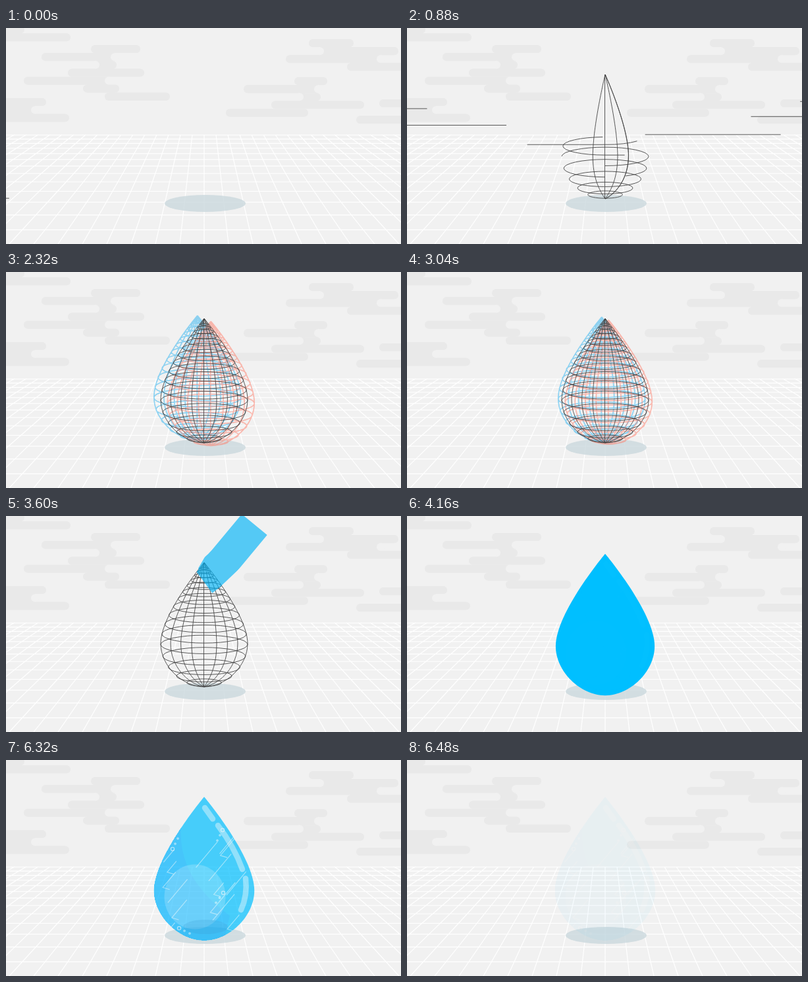
An HTML page with a canvas that plays this animation: 600 by 330 pixels, repeating every 6.56 s.

```html
<!DOCTYPE html>
<html lang="en">
<head>
<meta charset="utf-8">
<title>Water drop</title>
<style>
  html, body { margin: 0; width: 100%; height: 100%; overflow: hidden; background: #f1f1f1; }
  canvas { display: block; }
</style>
</head>
<body>
<canvas id="stage" width="600" height="330"></canvas>
<script>
const screen2d = document.getElementById('stage').getContext('2d');
const layer2d = new OffscreenCanvas(600, 330).getContext('2d');
let ctx = screen2d;

const LOOP = 6560, STEP = 80, CX = 301, TOP = 71, BELLY = 195, RADIUS = 66;
const TAU = Math.PI * 2, RING_COUNT = 16;
const BACK = '#f1f1f1', CLOUD = '#e9e9e9', WIRE = '#444';

const clamp = v => Math.max(0, Math.min(1, v));
const span = (t, from, to) => clamp((t - from) / (to - from));
const sine = u => (1 - Math.cos(Math.PI * u)) / 2;
const quadOut = u => 1 - (1 - u) ** 2;
const backOut = u => 1 + 3.5 * (u - 1) ** 3 + 2.5 * (u - 1) ** 2;

// Each cloud is a top edge and a stack of bars given by their left and right ends.
const CLOUDS = [
  [-4, [-20, 28], [-20, 98]],
  [26, [129, 204], [54, 159], [142, 168], [94, 210], [27, 150], [117, 172], [150, 249]],
  [107, [-20, 61], [-20, 38], [-20, 96]],
  [17, [460, 528], [483, 596], [425, 563], [518, 620]],
  [75, [438, 488], [361, 468], [452, 478], [403, 544], [334, 459]],
  [109, [567, 620]],
  [134, [532, 620]]
];

function stroke(color, width, build) {
  ctx.strokeStyle = color;
  ctx.lineWidth = width;
  ctx.beginPath();
  build();
  ctx.stroke();
}

function fillEllipse(color, x, y, rx, ry = rx) {
  ctx.fillStyle = color;
  ctx.beginPath();
  ctx.ellipse(x, y, rx, ry, 0, 0, TAU);
  ctx.fill();
}

// A bar end that falls short of both neighbours is hollow, any other is round.
function drawCloud([top, ...bars]) {
  const pitch = 12.1, r = 6;
  const hollows = [];
  bars.forEach(([left, right], i) => {
    const above = bars[i - 1], below = bars[i + 1], y = top + i * pitch;
    const inner = above && below;
    const l = inner && above[0] < left && below[0] < left;
    const rt = inner && above[1] > right && below[1] > right;
    const start = left - (l ? r : 0), end = right + (rt ? r : 0);
    ctx.fillStyle = CLOUD;
    ctx.beginPath();
    ctx.roundRect(start, y, end - start, pitch + .2, [l ? 0 : r, rt ? 0 : r, rt ? 0 : r, l ? 0 : r]);
    ctx.fill();
    if (l) hollows.push([start, y + pitch / 2]);
    if (rt) hollows.push([end, y + pitch / 2]);
  });
  for (const [x, y] of hollows) fillEllipse(BACK, x, y, r);
}

function drawScene() {
  ctx.fillStyle = BACK;
  ctx.fillRect(0, 0, 600, 330);
  CLOUDS.forEach(drawCloud);
  stroke('#fff', 1.2, () => {
    for (let k = 0; k <= 12; k++) {
      const y = 25.7 + 137.8 / (1 - .0427 * k);
      ctx.moveTo(0, y);
      ctx.lineTo(600, y);
    }
    for (let i = -17; i <= 17; i++) {
      ctx.moveTo(CX + 18 * i, 163);
      ctx.lineTo(CX + 37 * i, 330);
    }
  });
  fillEllipse('rgba(203,217,222,.8)', 302.5, 268, 61.5, 13);
}

// Inner meridians meet the bottom at a sharper angle than the outline.
function halfDrop(w) {
  const x = CX + w, lift = (RADIUS - Math.abs(w)) * .3;
  ctx.moveTo(CX, TOP);
  ctx.bezierCurveTo(CX, TOP, x, 150, x, BELLY);
  ctx.bezierCurveTo(x, 229, CX + w * .5, 261 - lift, CX, 261);
}

function dropPath() {
  ctx.beginPath();
  halfDrop(-RADIUS);
  ctx.bezierCurveTo(334, 261, 367, 229, 367, BELLY);
  ctx.bezierCurveTo(367, 150, CX, TOP, CX, TOP);
  ctx.closePath();
}

// Rings sit on a sphere up to the belly and crowd together towards the tip.
function ringShape(index) {
  if (index < 5) {
    const angle = .447 + .276 * index;
    return { y: BELLY + RADIUS * Math.cos(angle), rx: RADIUS * Math.sin(angle) ** 1.1 };
  }
  const height = (1 - (index - 4) / 15) ** 2;
  return { y: TOP + 125.5 * height, rx: RADIUS * (1.4 * height - .4 * height ** 3.5) };
}

// A line flies in along the ring's tangent and winds round it.
function ringPath(index, t) {
  const { y, rx } = ringShape(index);
  const dir = index % 2 ? -1 : 1, ry = rx * .215, age = t - index * 80;
  if (age < -55) return;
  const perimeter = Math.PI * (3 * (rx + ry) - Math.sqrt((3 * rx + ry) * (rx + 3 * ry)));
  const head = -CX + (CX + perimeter) * sine(span(age, -55, 740));
  const tail = -CX * (1 - quadOut(span(age, 305, 560)));
  ctx.moveTo(CX + dir * tail, y + ry);
  ctx.lineTo(CX + dir * Math.min(head, 0), y + ry);
  if (head > 0) {
    const turn = TAU * head / perimeter;
    ctx.ellipse(CX, y, rx, ry, 0, Math.PI / 2, Math.PI / 2 - dir * turn, dir > 0);
  }
}

// Meridians spread from the centre, each stopping at its own width.
function spreadMeridians(side, reach) {
  if (reach <= 0) return;
  for (let i = 1; i <= 4; i++) {
    const width = RADIUS * (i / 4) ** .9;
    halfDrop(side * Math.min(width, reach));
    if (width >= reach) break;
  }
}

function drawWire(t, color = WIRE, width = .9) {
  stroke(color, width, () => {
    for (let i = 0; i < RING_COUNT; i++) ringPath(i, t);
    const rise = span(t, 240, 640);
    if (!rise) return;
    ctx.moveTo(CX - .5, 261);
    ctx.lineTo(CX - .5, 261 - 190 * backOut(rise));
    spreadMeridians(1, (t - 626) * .14);
    spreadMeridians(-1, (t - 746) * .14);
  });
}

function drawGhosts(t) {
  const shift = t < 2560 ? sine(span(t, 1640, 2400)) : 1 - sine(span(t, 2720, 3360));
  if (shift <= 0) return;
  for (const [dir, color] of [[-1, 'rgba(60,185,240,.55)'], [1, 'rgba(255,125,105,.5)']]) {
    ctx.save();
    ctx.translate(dir * 10.5 * shift, dir * 4.5 * shift);
    drawWire(LOOP, color, 1.7);
    ctx.restore();
  }
}

function scaleDrop(s) {
  ctx.translate(CX, 166);
  ctx.scale(s, s);
  ctx.translate(-CX, -166);
}

// A broad ribbon dives in from the top right and winds through the drop.
function drawRibbon(t) {
  const entry = 210;
  const head = entry * span(t, 3400, 3600) + 850 * span(t, 3600, 4080);
  const tail = 187 * sine(span(t, 3440, 3760));
  ctx.save();
  scaleDrop(1 + .13 * sine(span(t, 3800, 4080)));
  dropPath();
  ctx.moveTo(313, 120);
  ctx.lineTo(460, -20);
  ctx.lineTo(368, -20);
  ctx.lineTo(308, 52);
  ctx.lineTo(292, 80);
  ctx.clip();
  ctx.setLineDash([Math.max(0, head - tail), 3000]);
  ctx.lineDashOffset = -tail;
  const alpha = .65 + .35 * span(t, 3760, 4160);
  stroke(`rgba(0,180,247,${alpha})`, 50, () => {
    ctx.moveTo(437, -59);
    ctx.lineTo(332, 68);
    ctx.quadraticCurveTo(314, 89, 270, 117);
    for (let i = 0; i < 6; i++) ctx.lineTo(i % 2 ? 240 : 360, 135 + 26 * i);
  });
  ctx.restore();
}

function seeded(seed) {
  return () => (seed = seed * 16807 % 2147483647) / 2147483647;
}

// Slanted traces, some of them ending in a hook.
function circuitPaths() {
  const random = seeded(41);
  for (let i = 0; i < 16; i++) {
    const x = 232 + random() * 110, y = 125 + (i + random()) * 9, length = 14 + random() * 50;
    const hook = random() < .6 ? 10 : 0;
    ctx.moveTo(x + length * .64, y - length * .77);
    ctx.lineTo(x, y);
    ctx.lineTo(x + hook, y + hook * .3);
  }
}

function drawNodes() {
  const rows = [[253, 136, 4, -8], [329, 107, -4, 8], [330, 203, -5.5, 7.5], [263, 257, 8, 4]];
  for (const [x, y, dx, dy] of rows)
    for (let i = 0; i < 3; i++)
      stroke('rgba(255,255,255,.6)', 1.2, () => ctx.arc(x + dx * i, y + dy * i, i ? 1.2 : 2.6, 0, TAU));
}

function drawDropDetails(t) {
  ctx.globalAlpha = sine(span(t, 4120, 4560));
  ctx.fillStyle = '#00b3ff';
  ctx.beginPath();
  ctx.moveTo(266, 98);
  ctx.bezierCurveTo(262, 150, 282, 195, 340, 238);
  ctx.lineTo(330, 280);
  ctx.lineTo(200, 280);
  ctx.lineTo(200, 150);
  ctx.fill();
  fillEllipse('rgba(255,255,255,.2)', 287, 209, 46.5, 49.5);
  fillEllipse('rgba(0,140,215,.32)', 303, 255, 34, 11);

  ctx.lineCap = 'round';
  stroke('rgba(255,255,255,.42)', 8.5, () => {
    ctx.moveTo(302, 73);
    ctx.lineTo(314, 90);
    ctx.moveTo(322, 100);
    ctx.quadraticCurveTo(347, 133, 359, 167);
    ctx.moveTo(364, 181);
    ctx.quadraticCurveTo(367, 207, 357, 229);
  });
  ctx.setLineDash([130 * span(t, 4160, 4640), 400]);
  stroke('rgba(255,255,255,.48)', 1.2, circuitPaths);
  ctx.setLineDash([]);
  drawNodes();
}

// The finished drop is painted on its own layer so that it fades as one piece.
function drawDrop(t) {
  ctx = layer2d;
  ctx.clearRect(0, 0, 600, 330);
  ctx.save();
  ctx.save();
  scaleDrop(1.13 + .025 * span(t, 4080, 4320));
  dropPath();
  ctx.restore();
  ctx.fillStyle = '#00bfff';
  ctx.fill();
  ctx.clip();
  drawDropDetails(t);
  ctx.restore();

  ctx = screen2d;
  ctx.globalAlpha = 1 - span(t, 6250, 6488);
  ctx.drawImage(layer2d.canvas, 0, 0);
  ctx.globalAlpha = 1;
}

function frame(now) {
  const t = Math.floor(now % LOOP / STEP) * STEP;
  drawScene();
  if (t < 4160) {
    drawGhosts(t);
    drawWire(t);
    if (t >= 3440) drawRibbon(t);
  } else {
    drawDrop(t);
  }
  requestAnimationFrame(frame);
}
requestAnimationFrame(frame);
</script>
</body>
</html>
```
